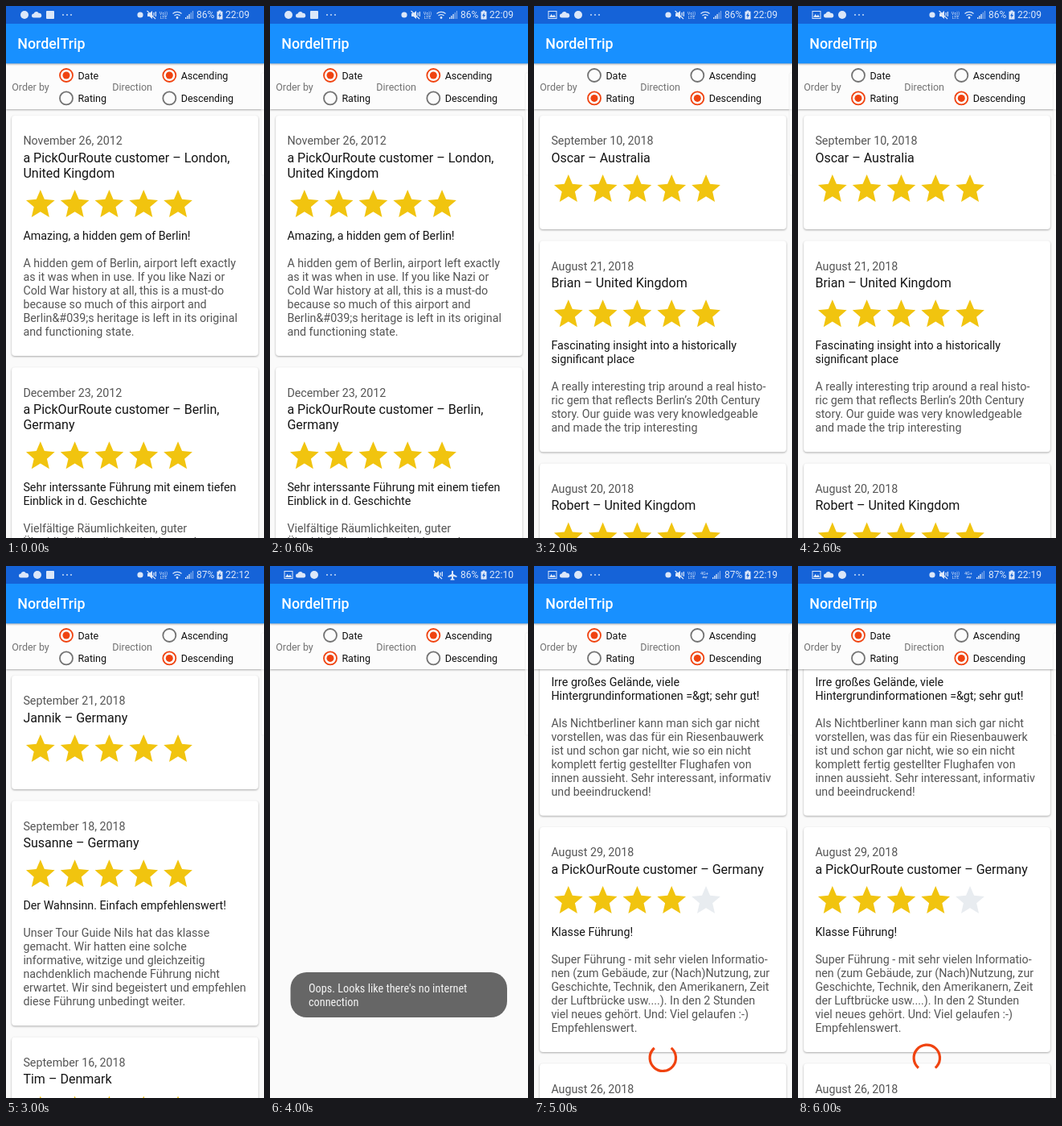
An HTML page that plays this animation: 321x660 px, repeating every 7 s.

```html
<!DOCTYPE html>
<html lang="en">
<head>
<meta charset="utf-8">
<style>
  html, body { margin: 0; width: 100%; height: 100%; overflow: hidden; background: #fafafa; }
  svg { display: block; font-family: Roboto, sans-serif; }
  .shadow { filter: drop-shadow(0 1px 1.3px rgba(0, 0, 0, .32)); }
  .line { fill: none; stroke: currentColor; }
  .toast { font: 14.27px "Roboto Condensed", Roboto, sans-serif; font-stretch: condensed; }
</style>
</head>
<body>
<svg id="stage" width="321" height="660" viewBox="0 0 321 660"></svg>
<script>
const ACCENT = '#f04310', GREY = '#737373', DARK = '#151515', BODY = '#555';
const STAR = 'M12 17.27L18.18 21l-1.64-7.03L22 9.24l-7.19-.61L12 2 9.19 8.63 2 9.24l5.46 4.73L5.82 21z';

const escapeText = s => s.replace(/&/g, '&amp;').replace(/</g, '&lt;');
const text = (x, y, s, size, fill, extra = '') =>
  `<text x="${x}" y="${y}" font-size="${size}" fill="${fill}" ${extra}>${escapeText(s)}</text>`;
const rect = (x, y, w, h, fill, extra = '') =>
  `<rect x="${x}" y="${y}" width="${w}" height="${h}" fill="${fill}" ${extra}/>`;
const circle = (x, y, r, extra = '') => `<circle cx="${x}" cy="${y}" r="${r}" ${extra}/>`;
const line = (d, width = 1.2) => `<path class="line" stroke-width="${width}" d="${d}"/>`;
const at = (x, y, content, scale = 1) => `<g transform="translate(${x} ${y}) scale(${scale})">${content}</g>`;

// Status bar icons, each centred on its own origin
const icons = {
  image: rect(-5, -4.5, 10, 9, 'none', 'stroke="#fff"') + '<path d="M-4 3l2.5-4 2 2.5 1.5-2 2 3.5z"/>',
  cloud: '<path d="M-4.5 3.5a2.5 2.5 0 0 1 0-5a3.5 3.5 0 0 1 6.4-.6a2.9 2.9 0 0 1 1.4 5.6z"/>',
  disc: circle(0, 0, 5),
  square: rect(-5, -5, 10, 10, '#fff', 'rx="1"'),
  dots: [-5, 0, 5].map(x => circle(x, 0, .9)).join(''),
  dot: circle(0, 0, 3.6),
  mute: '<path d="M-5-2h2.5l3.5-3v10l-3.5-3h-2.5z"/>' + line('M-5.5-5L5 5M3-3v4M5.3-4v6'),
  volte: text(0, -.3, 'Vo))', 5.5, '#fff', 'text-anchor="middle"') + text(0, 5, 'LTE', 5.5, '#fff', 'text-anchor="middle"'),
  wifi: line('M-5.5-1.5a8 8 0 0 1 11 0M-3.5 1a5 5 0 0 1 7 0') + circle(0, 3.5, 1.4),
  mobile: text(0, -.5, '4G+', 5.5, '#fff', 'text-anchor="middle"') + '<path opacity=".6" d="M-3 4l2-3 2 3zM0 2h4l-2 3z"/>',
  signal: [0, 1, 2, 3, 4].map(i => rect(-5 + i * 2.2, 3 - i * 2, 1.3, 2 + i * 2, '#fff', i > 2 ? 'opacity=".5"' : '')).join(''),
  plane: '<path d="M-1-5h2v4l4.5 2.5v1.5l-4.5-1v2.5l1.5 1v1h-5v-1l1.5-1v-2.5l-4.5 1v-1.5l4.5-2.5z"/>',
  battery: '<path d="M-1.5-5.5h3v1.2h2v9.7h-7v-9.7h2z"/><path fill="#1563d8" d="M.8-3.2l-2.8 4.4h1.7l-.5 3 2.8-4.3h-1.7z"/>'
};

const RADIO_SETS = {
  wifi: { dot: 167, mute: 181, volte: 196, wifi: 213, signal: 228 },
  mobile: { dot: 167, mute: 181, volte: 196, mobile: 212, signal: 227 },
  plane: { mute: 209, plane: 227 }
};

function statusBar({ left, radios, charge, clock }) {
  const place = (name, x) => at(x, 11, icons[name]);
  return rect(0, 0, 321, 22, '#1563d8') + '<g fill="#fff" color="#fff" opacity=".85">' +
    left.map((name, i) => place(name, 23 + i * 16)).join('') + place('dots', 76) +
    Object.entries(RADIO_SETS[radios]).map(([name, x]) => place(name, x)).join('') +
    place('battery', 266) + text(237, 15.3, charge, 12, '#fff') + text(273, 15.3, clock, 12, '#fff') + '</g>';
}

function radio(x, y, label, on) {
  const color = on ? ACCENT : GREY;
  return circle(x, y, 8, `fill="none" stroke="${color}" stroke-width="1.8"`) +
    (on ? circle(x, y, 4.5, `fill="${color}"`) : '') + text(x + 14.4, y + 4.6, label, 12.5, '#111');
}

function header(scene) {
  const { order, direction } = scene;
  return rect(0, 71, 321, 57, '#fcfcfc', 'class="shadow"') + rect(0, 22, 321, 49.3, '#1890ff', 'class="shadow"') +
    statusBar(scene) + text(14.3, 53.2, 'NordelTrip', 17.84, '#fff', 'font-weight="500"') +
    text(7.2, 105.3, 'Order by', 12.5, GREY) + text(132.3, 105.3, 'Direction', 12.5, GREY) +
    radio(75, 86, 'Date', order === 'Date') + radio(75, 114.4, 'Rating', order === 'Rating') +
    radio(203.3, 86, 'Ascending', direction === 'Asc') + radio(203.3, 114.4, 'Descending', direction === 'Desc') +
    rect(317.5, 83, 6, 127, '#fff', 'rx="2" opacity=".6" stroke="#e2e2e2" stroke-width=".6"');
}

// Lays out one review below `top`; returns its markup and bottom edge
function card(top, { date, name, stars = 5, headline = '', body = '' }) {
  let y = top + 36.3, out = text(21.4, y, date, 14.27, BODY);
  const block = (s, size, step, fill) => s.split('\n').forEach((row, i) => {
    if (i) y += step;
    out += text(21.4, y, row, size, fill);
  });
  y += 21.4;
  block(name, 16.05, 19, DARK);
  for (let i = 0; i < 5; i++)
    out += at(21.4 + i * 42.8, y + 11.7, `<path d="${STAR}" fill="${i < stars ? '#f1c40f' : '#e8ecf0'}"/>`, 1.785);
  y += 77.3;
  if (headline) {
    block(headline, 14.27, 17, DARK);
    y += 34;
    block(body, 14.27, 17, BODY);
    y += 25;
  } else y += 6;
  return { out: rect(7.1, top, 306.8, y - top, '#fff', 'rx="4" class="shadow"') + out, bottom: y };
}

function reviews(top, list) {
  return list.map(item => {
    const { out, bottom } = card(top, item);
    top = bottom + 14.3;
    return out;
  }).join('');
}

function captureTools() {
  const tools = [
    ['Tavro Lenses', circle(0, 0, 7, 'fill="#444"')],
    ['Capturar mais', line('M-8-4v-4h4M4-8h4v4M8 4v4h-4M-4 8h-4v-4M-3-2l3-2.5 3 2.5M-3 1l3 3 3-3')],
    ['Desenhar', line('M-7 7l1.5-5L4-7.5l3.5 3.5L-2 5.5zM1.5-5l3.5 3.5')],
    ['Recortar', line('M-5-8.5v13.5h13.5M-8.5-5h13.5v13.5')],
    ['Compartilhar', line('M3-4.3L-3.2-1M-3.2 1L3 4.3') +
      [[5, -5.3], [-5, 0], [5, 5.3]].map(([x, y]) => circle(x, y, 2.2, 'class="line" stroke-width="1.2"')).join('')]
  ];
  const thumbnail = rect(262.5, 485.5, 52.5, 103, '#fff', 'rx="2" class="shadow"') +
    '<svg x="264" y="487" width="49.5" height="100" viewBox="0 0 321 660" preserveAspectRatio="none">' + render(scenes[0]) + '</svg>';
  return thumbnail + rect(5.5, 599.5, 310, 54.5, '#fafafa', 'rx="5" opacity=".9" class="shadow"') +
    '<g color="#444">' + tools.map(([label, icon], i) => at(39.5 + i * 60.5, 620.5, icon +
      text(0, 21.5, label, 8.8, '#444', 'text-anchor="middle"'))).join('') + '</g>';
}

const toast = () => rect(25.5, 504, 269.5, 56, '#666', 'rx="20"') +
  text(48, 529.3, "Oops. Looks like there's no internet", 14.27, '#f4f4f4', 'class="toast"') +
  text(48, 546.2, 'connection', 14.27, '#f4f4f4', 'class="toast"');

const spinner = start => () => at(160.3, 610.3, `<circle r="16.2" fill="none" stroke="${ACCENT}" stroke-width="3.2"
  pathLength="360" stroke-dasharray="280 80" transform="rotate(${start})"/>`);

const scrolled = [
  { date: 'August 31, 2018', name: 'Germany', headline: 'Irre großes Gelände, viele\nHintergrundinformationen =&gt; sehr gut!',
    body: 'Als Nichtberliner kann man sich gar nicht\nvorstellen, was das für ein Riesenbauwerk\nist und schon gar nicht, wie so ein nicht\nkomplett fertig gestellter Flughafen von\ninnen aussieht. Sehr interessant, informativ\nund beeindruckend!' },
  { date: 'August 29, 2018', name: 'a PickOurRoute customer – Germany', stars: 4, headline: 'Klasse Führung!',
    body: 'Super Führung - mit sehr vielen Informatio-\nnen (zum Gebäude, zur (Nach)Nutzung, zur\nGeschichte, Technik, den Amerikanern, Zeit\nder Luftbrücke usw....). In den 2 Stunden\nviel neues gehört. Und: Viel gelaufen :-)\nEmpfehlenswert.' },
  { date: 'August 26, 2018', name: 'Germany' }
];
const latest = { left: ['image', 'cloud', 'disc'], radios: 'mobile', charge: '87%', clock: '22:19',
  order: 'Date', direction: 'Desc', top: 13.7, list: scrolled };

const scenes = [
  { left: ['disc', 'cloud', 'square'], radios: 'wifi', charge: '86%', clock: '22:09', order: 'Date', direction: 'Asc', list: [
    { date: 'November 26, 2012', name: 'a PickOurRoute customer – London,\nUnited Kingdom', headline: 'Amazing, a hidden gem of Berlin!',
      body: 'A hidden gem of Berlin, airport left exactly\nas it was when in use. If you like Nazi or\nCold War history at all, this is a must-do\nbecause so much of this airport and\nBerlin&#039;s heritage is left in its original\nand functioning state.' },
    { date: 'December 23, 2012', name: 'a PickOurRoute customer – Berlin,\nGermany',
      headline: 'Sehr interssante Führung mit einem tiefen\nEinblick in d. Geschichte',
      body: 'Vielfältige Räumlichkeiten, guter\nÜberblick über die Geschichte und' }] },
  { left: ['image', 'disc', 'cloud'], radios: 'wifi', charge: '86%', clock: '22:09', order: 'Rating', direction: 'Asc', list: [
    { date: 'August 25, 2018', name: 'Gianmarco – Italy', stars: 1, headline: 'Sono arrivato in ritardo e non ho\nfatto la visita',
      body: 'Colpa mia...colpa della applicazione che mi\nha fatto scendere a 3km di distanza...colpa\ndei berlinesi che in un posto sterminato\nhanno messo un entrata introvabile e\ninsulsa oltre che non segnalata...colpa\nvostra che sulla prenotazione non avete\nscritto nulla di più perché risultasse\nintellegibile...insomma il museo sarà anche\ninteressante ma la zona è brutta senza\nse e senza ma...' },
    { date: 'April 21, 2018', name: 'Joachim – Geesthacht, Germany', stars: 1, headline: 'dent so...' }], overlay: captureTools },
  { left: ['image', 'cloud', 'disc'], radios: 'wifi', charge: '86%', clock: '22:09', order: 'Rating', direction: 'Desc', list: [
    { date: 'September 10, 2018', name: 'Oscar – Australia' },
    { date: 'August 21, 2018', name: 'Brian – United Kingdom', headline: 'Fascinating insight into a historically\nsignificant place',
      body: 'A really interesting trip around a real histo-\nric gem that reflects Berlin’s 20th Century\nstory. Our guide was very knowledgeable\nand made the trip interesting' },
    { date: 'August 20, 2018', name: 'Robert – United Kingdom' }] },
  { left: ['cloud', 'disc', 'square'], radios: 'wifi', charge: '87%', clock: '22:12', order: 'Date', direction: 'Desc', list: [
    { date: 'September 21, 2018', name: 'Jannik – Germany' },
    { date: 'September 18, 2018', name: 'Susanne – Germany', headline: 'Der Wahnsinn. Einfach empfehlenswert!',
      body: 'Unser Tour Guide Nils hat das klasse\ngemacht. Wir hatten eine solche\ninformative, witzige und gleichzeitig\nnachdenklich machende Führung nicht\nerwartet. Wir sind begeistert und empfehlen\ndiese Führung unbedingt weiter.' },
    { date: 'September 16, 2018', name: 'Tim – Denmark' }] },
  { left: ['image', 'cloud', 'disc'], radios: 'plane', charge: '86%', clock: '22:10', order: 'Rating', direction: 'Asc', list: [], overlay: toast },
  { ...latest, overlay: spinner(-50) },
  { ...latest, overlay: spinner(130) }
];

function render(scene) {
  return rect(0, 0, 321, 660, '#fafafa') + reviews(scene.top ?? 136, scene.list) +
    header(scene) + (scene.overlay ? scene.overlay() : '');
}

const stage = document.getElementById('stage');
stage.innerHTML = scenes.map(scene => `<g display="none">${render(scene)}</g>`).join('');
const views = [...stage.children], start = performance.now();

function tick() {
  const current = Math.floor((performance.now() - start) / 1000) % views.length;
  views.forEach((view, i) => view.setAttribute('display', i === current ? 'inline' : 'none'));
  requestAnimationFrame(tick);
}
tick();
</script>
</body>
</html>
```
